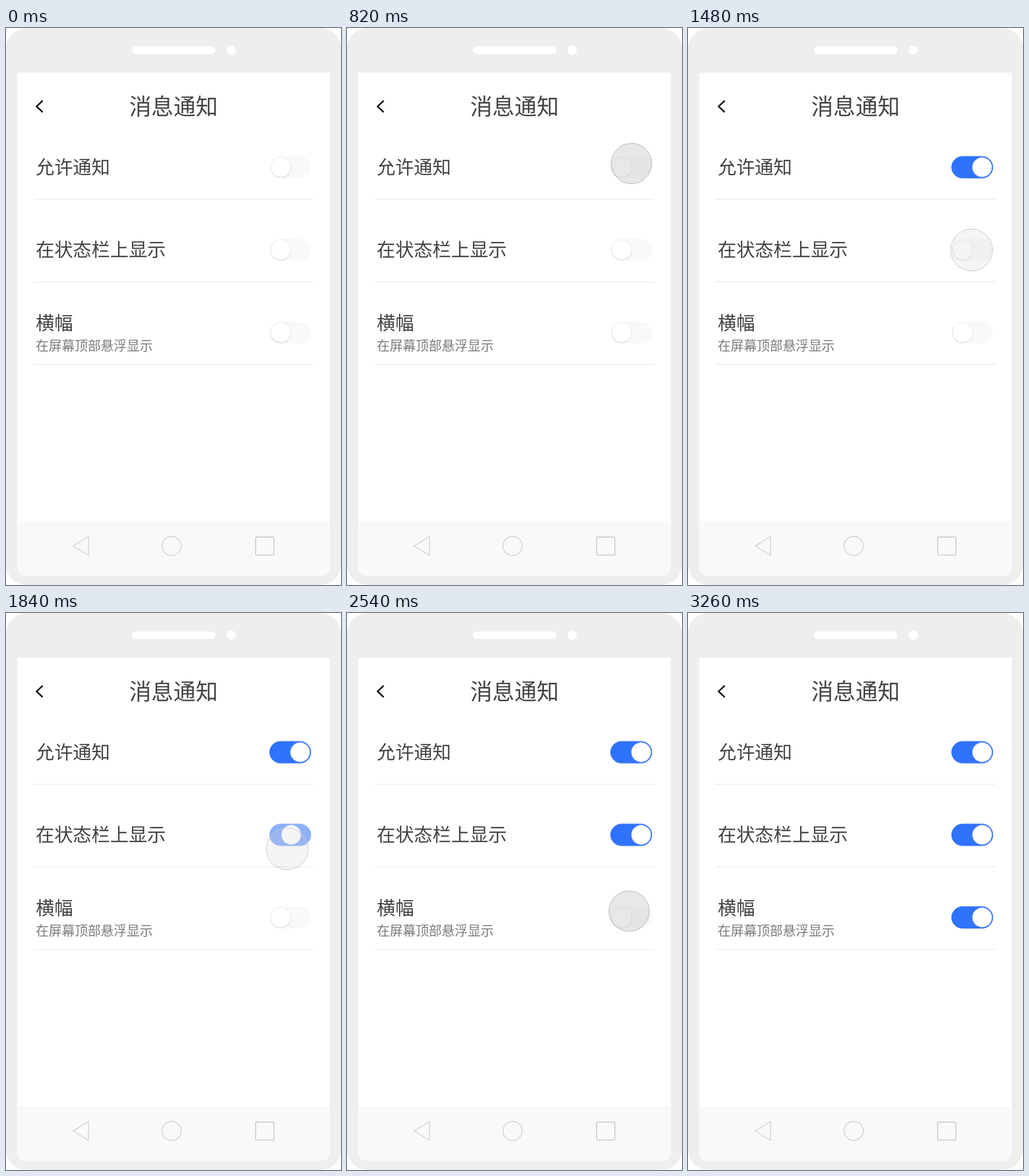
Write an HTML page that moves like this. It is 580 px wide and 966 px high and loops after 3940 ms.

```html
<!DOCTYPE html>
<html lang="zh-CN">
<head>
<meta charset="utf-8">
<title>消息通知</title>
<style>
  html, body { margin: 0; width: 100%; height: 100%; overflow: hidden; background: #fff; }
  svg { display: block; width: 580px; height: 966px; }
  text { font-family: "Noto Sans CJK SC", "Noto Sans CJK", sans-serif; fill: #434343; }
  .title { font-size: 38.4px; text-anchor: middle; }
  .label { font-size: 32.2px; }
  .note { font-size: 22.5px; fill: #7a7a7a; }
  .rule { stroke: #ebebeb; stroke-width: 1.5; }
  .nav { fill: none; stroke: #cfcfcf; stroke-width: 1.4; }
  .fill { fill: #2f72fd; stroke: #2b6af0; }
  .knob { fill: #fff; }
  .shade { fill: #000; filter: blur(1.2px); }
</style>
</head>
<body>
<svg viewBox="0 0 580 966" lang="zh-CN">
  <rect width="580" height="966" rx="36" fill="#eee"/>
  <rect x="218" y="32" width="144.5" height="13" rx="6.5" fill="#fff"/>
  <circle cx="390" cy="38.5" r="8" fill="#fff"/>
  <path d="M19.5 77.5H560.5V936a14 14 0 0 1-14 14H33.5a14 14 0 0 1-14-14z" fill="#fff"/>
  <path d="M19.5 856H560.5V936a14 14 0 0 1-14 14H33.5a14 14 0 0 1-14-14z" fill="#f9f9f9"/>
  <path d="M63.5 126L53 136L63.5 146" fill="none" stroke="#111" stroke-width="2.7"/>

  <text class="title" x="290" y="149.8">消息通知</text>
  <text class="label" x="51.5" y="253.4">允许通知</text>
  <text class="label" x="51.5" y="396.4">在状态栏上显示</text>
  <text class="label" x="51.5" y="523.2">横幅</text>
  <text class="note" x="51.5" y="559">在屏幕顶部悬浮显示</text>

  <path class="rule" d="M48 297H532M48 440.3H532M48 583.5H532"/>

  <path class="nav" d="M116.3 898.3L142.7 882V914.5z"/>
  <circle class="nav" cx="286.7" cy="898.3" r="16.6"/>
  <rect class="nav" x="432.3" y="882.7" width="31.4" height="31.4" rx="2" style="stroke:#c2c2c2"/>

  <g id="toggles"></g>
  <g id="touch"><circle id="disc" r="36.3"/></g>
</svg>
<script>
const LOOP = 3940, STEP = 20;
const HOLD = 100;
const KNOB_TRAVEL = 33.6;

const ROWS = [
  { y: 241.5, press: 820 },
  { y: 384.7, press: 1680 },
  { y: 528, press: 2540 }
];

// Each leg runs along its curve and may stall once on the way
const LEGS = [
  { start: 40, end: 660, stall: 400, wait: 180, d: "M518-50C518 60 516 211 492.5 235" },
  { start: 900, end: 1480, stall: 1300, wait: 60, d: "M492.5 235C502 275 506 345 491 385" },
  { start: 1760, end: 2380, stall: 2140, wait: 80, d: "M491 385C485 415 475 490 488.5 517" },
  { start: 2620, end: 3560, stall: 3560, wait: 0, d: "M488.5 517C540 540 482 140 477-80" }
];

const clamp = (v, lo = 0, hi = 1) => Math.max(lo, Math.min(hi, v));
const bezier = (u, a, b) => 3 * u * (1 - u) * ((1 - u) * a + u * b) + u ** 3;

// Same curve as the CSS keyword "ease"
function ease(x) {
  let lo = 0, hi = 1;
  for (let i = 0; i < 20; i++) {
    const mid = (lo + hi) / 2;
    if (bezier(mid, 0.25, 0.25) < x) lo = mid; else hi = mid;
  }
  return bezier(lo, 0.1, 1);
}

for (const leg of LEGS) {
  leg.path = document.createElementNS("http://www.w3.org/2000/svg", "path");
  leg.path.setAttribute("d", leg.d);
}

function position(t) {
  const leg = LEGS.findLast(l => t >= l.start) || LEGS[0];
  const moved = t - leg.start - clamp(t - leg.stall, 0, leg.wait);
  const part = ease(clamp(moved / (leg.end - leg.start - leg.wait)));
  return leg.path.getPointAtLength(part * leg.path.getTotalLength());
}

// Full while held, then fades
const pressed = t => Math.max(...ROWS.map(({ press }) =>
  t < press ? 0 : 1 - clamp((t - press - HOLD + STEP) / 60)));

const switched = (t, press) => 1 - Math.exp(-Math.max(0, t - press - HOLD + STEP / 2) / 90);

function play(el, pose) {
  const frames = [];
  for (let t = 0; t <= LOOP; t += STEP)
    frames.push({ ...pose(t), offset: t / LOOP, easing: "steps(1, end)" });
  el.animate(frames, { duration: LOOP, iterations: Infinity });
}

const toggles = document.getElementById("toggles");
toggles.innerHTML = ROWS.map(({ y }) => `
  <g transform="translate(0 ${y})">
    <rect x="457" y="-19" width="71" height="38" rx="19" fill="#f9f9f9"/>
    <rect class="fill" x="456.5" y="-18.8" width="71.3" height="37.6" rx="18.8"/>
    <g class="slide">
      <circle class="shade" cx="475.6" cy="0.8" r="17.5"/>
      <circle class="knob" cx="475.6" r="16.9"/>
    </g>
  </g>`).join("");

ROWS.forEach(({ press }, i) => {
  const part = name => toggles.children[i].querySelector(name);
  const on = t => switched(t, press);
  play(part(".fill"), t => ({ opacity: on(t) }));
  play(part(".slide"), t => ({ transform: `translateX(${KNOB_TRAVEL * on(t)}px)` }));
  play(part(".shade"), t => ({ opacity: 0.13 * (1 - on(t)) }));
});

play(document.getElementById("touch"), t => {
  const { x, y } = position(t);
  return { transform: `translate(${x}px, ${y}px) scale(${1 - 0.035 * pressed(t)})` };
});
play(document.getElementById("disc"), t => {
  const p = pressed(t), tone = 210 - 10 * p, edge = 198 - 28 * p;
  return {
    fill: `rgba(${tone}, ${tone}, ${tone}, ${0.22 + 0.2 * p})`,
    stroke: `rgb(${edge}, ${edge}, ${edge})`
  };
});
</script>
</body>
</html>
```
